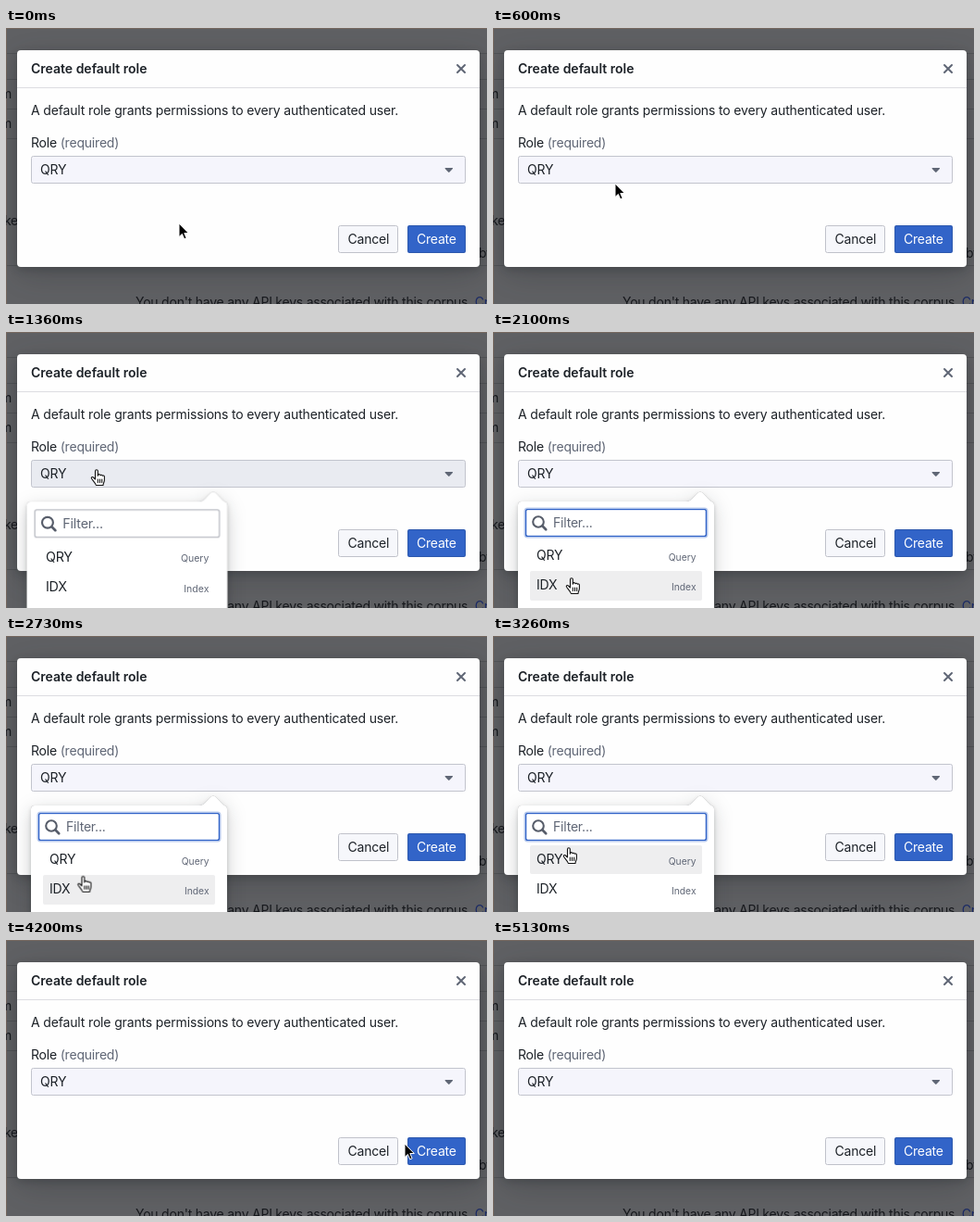
Write an HTML page that moves like this. It is 520 px wide and 298 px high and loops after 5230 ms.

```html
<!DOCTYPE html>
<html lang="en">
<head>
<meta charset="utf-8">
<title>Create default role</title>
<style>
  html, body { margin: 0; width: 100%; height: 100%; overflow: hidden; background: #606164; }
  svg { display: block; width: 520px; height: 298px; }
  text { font: 14px Inter, "Liberation Sans", sans-serif; letter-spacing: -.2px; fill: #1c2127; }
  .title { font-weight: 600; letter-spacing: 0; }
  .lead { letter-spacing: -.155px; }
  .muted { fill: #5f6675; }
  .small { font-size: 10.3px; letter-spacing: 0; text-anchor: end; fill: #5f6675; }
  .page text { fill: #17191d; letter-spacing: -.23px; }
  .page .link { fill: #1a2a66; }
  .page path { stroke: #515356; }
  .dialog { filter: drop-shadow(0 3px 4px rgba(16,22,26,.22)) drop-shadow(0 8px 18px rgba(16,22,26,.22)); }
  .panel { filter: drop-shadow(0 0 .7px rgba(17,20,24,.4)) drop-shadow(0 2px 2px rgba(17,20,24,.18)) drop-shadow(0 6px 10px rgba(17,20,24,.2)); }

  .select, .create, .focus, .row, .hand, .arrow, .popover, .pointer {
    animation: 5230ms step-end infinite;
  }
  .select { fill: #f5f5fc; animation-name: select; }
  .create { fill: #3264c8; animation-name: create; }
  .focus { opacity: 0; animation-name: focus; }
  .row { fill: #eeeeef; opacity: 0; }
  .first { animation-name: first; }
  .second { animation-name: second; }
  .hand { opacity: 0; animation-name: hand; }
  .arrow { animation-name: arrow; }
  .popover { transform-origin: 224px 172px; transform: scale(0); animation-name: popover; }
  .pointer { animation-name: pointer; }

  @keyframes select {
    0% { fill: #f5f5fc; }
    11.53% { fill: #e9ebf1; }
    19.694% { fill: #d7d9e4; }
    21.033% { fill: #e9ebf1; }
    36.329%, 100% { fill: #f5f5fc; }
  }
  @keyframes create {
    0% { fill: #3264c8; }
    81.511% { fill: #2957b2; }
    84.073%, 100% { fill: #3264c8; }
  }
  @keyframes focus {
    0% { opacity: 0; }
    27.15% { opacity: 1; }
    69.407%, 100% { opacity: 0; }
  }
  @keyframes first {
    0% { opacity: 0; }
    38.872% { opacity: 1; }
    40.153% { opacity: 0; }
    52.83% { opacity: 1; }
    69.407%, 100% { opacity: 0; }
  }
  @keyframes second {
    0% { opacity: 0; }
    40.153% { opacity: 1; }
    52.83%, 100% { opacity: 0; }
  }
  @keyframes hand {
    0% { opacity: 0; }
    11.53% { opacity: 1; }
    36.329% { opacity: 0; }
    38.872% { opacity: 1; }
    68.834% { opacity: 0; }
    81.511% { opacity: 1; }
    84.073%, 100% { opacity: 0; }
  }
  @keyframes arrow {
    0% { opacity: 1; }
    11.53% { opacity: 0; }
    36.329% { opacity: 1; }
    38.872% { opacity: 0; }
    68.834% { opacity: 1; }
    81.511% { opacity: 0; }
    84.073%, 100% { opacity: 1; }
  }
  @keyframes popover {
    0% { transform: scale(0); }
    21.033% { transform: scale(0); animation-timing-function: cubic-bezier(.54, 1.12, .38, 1.11); }
    26.769% { transform: scale(1); }
    63.671% { transform: scale(1); animation-timing-function: cubic-bezier(.54, 1.12, .38, 1); }
    69.407%, 100% { transform: scale(0); }
  }
  /* The pointer moves in steps of a fifteenth of a second. */
  @keyframes pointer {
    0% { transform: translate(187px, 211px); }
    .574% { transform: translate(187px, 211px); animation-timing-function: steps(3, start); }
    4.4% { transform: translate(184px, 207px); }
    7.648% { transform: translate(184px, 207px); animation-timing-function: steps(3, start); }
    11.53% { transform: translate(132px, 168px); animation-timing-function: steps(4, start); }
    16.56% { transform: translate(98px, 149px); }
    36.329% { transform: translate(98px, 149px); animation-timing-function: steps(4, start); }
    41.396% { transform: translate(85px, 266px); animation-timing-function: steps(4, start); }
    46.463% { transform: translate(84px, 270px); }
    50.287% { transform: translate(84px, 270px); animation-timing-function: steps(8, start); }
    60.478% { transform: translate(82px, 229px); }
    75.143% { transform: translate(82px, 229px); animation-timing-function: steps(5, start); }
    81.511% { transform: translate(431px, 220px); animation-timing-function: steps(3, start); }
    85.373% { transform: translate(500px, 226px); animation-timing-function: steps(2, start); }
    87.897%, 100% { transform: translate(528px, 232px); }
  }
</style>
</head>
<body>
<svg viewBox="0 0 520 298" xmlns="http://www.w3.org/2000/svg">
  <g class="page">
    <rect width="520" height="298" fill="#606164"/>
    <path d="M0 27.5H520M0 55.5H520M0 87.5H520M0 119.5H520M0 256.5H520"/>
    <path d="M0 .5H520M.5 0V298" style="stroke:#75675f"/>
    <text x="6" y="76" text-anchor="end">m</text>
    <text x="6" y="108" text-anchor="end">m</text>
    <text x="13" y="213" text-anchor="end">ke</text>
    <text x="511" y="248">by</text>
    <text x="140" y="301">You don't have any API keys associated with this corpus. <tspan class="link">Create one</tspan></text>
  </g>

  <rect class="dialog" x="12" y="24" width="500" height="234" rx="4" fill="#fefefe"/>
  <path d="M12 64.5H512" stroke="#dcdde1"/>
  <text class="title" x="27" y="49">Create default role</text>
  <path d="M488 40l8 8m0-8l-8 8" stroke="#5f6675" stroke-width="2" stroke-linecap="round"/>
  <text class="lead" x="27" y="94">A default role grants permissions to every authenticated user.</text>
  <text x="27" y="129">Role <tspan class="muted">(required)</tspan></text>

  <rect class="select" x="27.5" y="138.5" width="469" height="29" rx="2" stroke="#c2c4cd"/>
  <text x="37" y="158">QRY</text>
  <path d="M475 151h7.600q.8 .3 .3 1l-3.400 3.600q-.7 .6-1.400 0l-3.400-3.600q-.5-.7 .3-1z" fill="#5f6675"/>

  <rect x="359.5" y="213.5" width="64" height="29" rx="2" fill="#f6f7fb" stroke="#c0c2ca"/>
  <text x="369.5" y="233">Cancel</text>
  <rect class="create" x="434" y="213" width="63" height="30" rx="2"/>
  <rect x="434.5" y="213.5" width="62" height="29" rx="2" fill="none" stroke="#111418" stroke-opacity=".15"/>
  <text x="444" y="233" style="fill:#fff">Create</text>

  <g class="popover">
    <path class="panel" fill="#fff" d="M31 183H209C214 183 216 179 221 174Q224 171 227 174C231 178 233 181 236 183Q239 183.5 239 187V330H27V187Q27 183 31 183Z"/>
    <rect x="35.5" y="191.5" width="195" height="29" rx="2" fill="#fff" stroke="#a6a9b2"/>
    <g class="focus" fill="none" stroke="#3264c8">
      <rect x="35" y="191" width="196" height="30" rx="2.5" stroke-width="3" stroke-opacity=".35"/>
      <rect x="35.5" y="191.5" width="195" height="29" rx="2" stroke-width="1.2"/>
    </g>
    <g fill="none" stroke="#575d6a" stroke-linecap="round">
      <circle cx="49" cy="205" r="5.8" stroke-width="2.1"/>
      <path d="M53.5 209.5l3.700 3.700" stroke-width="2.700"/>
    </g>
    <text class="muted" x="65" y="211">Filter...</text>
    <rect class="row first" x="40" y="226" width="186" height="31" rx="2"/>
    <rect class="row second" x="40" y="258" width="186" height="32" rx="2"/>
    <text x="47" y="246">QRY</text>
    <text class="small" x="219.5" y="246.5">Query</text>
    <text x="47" y="278">IDX</text>
    <text class="small" x="219.5" y="278.5">Index</text>
  </g>

  <g class="pointer">
    <path class="arrow" d="M0 0V14.5L3.400 11.400 5.700 16.800 8.100 15.800 5.800 10.500H10.300Z" fill="#000" stroke="#fff"/>
    <g class="hand" stroke="#111" stroke-width="1.1" stroke-linejoin="round" stroke-linecap="round">
      <path fill="#fff" d="M-1.500 9V1.200a1.400 1.400 0 0 1 2.800 0V6.200l.4-.9a1.300 1.300 0 0 1 2.400 .5 1.300 1.300 0 0 1 2.300 .5 1.200 1.200 0 0 1 2 .9V11c0 2-1.400 3-1.400 5.500H-.6C-1 14.500-4 11.500-5.500 9.300-6.300 7.800-4.700 7-3.500 8L-1.500 10Z"/>
      <path fill="none" d="M1.300 10v3.500M3.500 10v3.500M5.700 10v3.500"/>
    </g>
  </g>
</svg>
</body>
</html>
```
